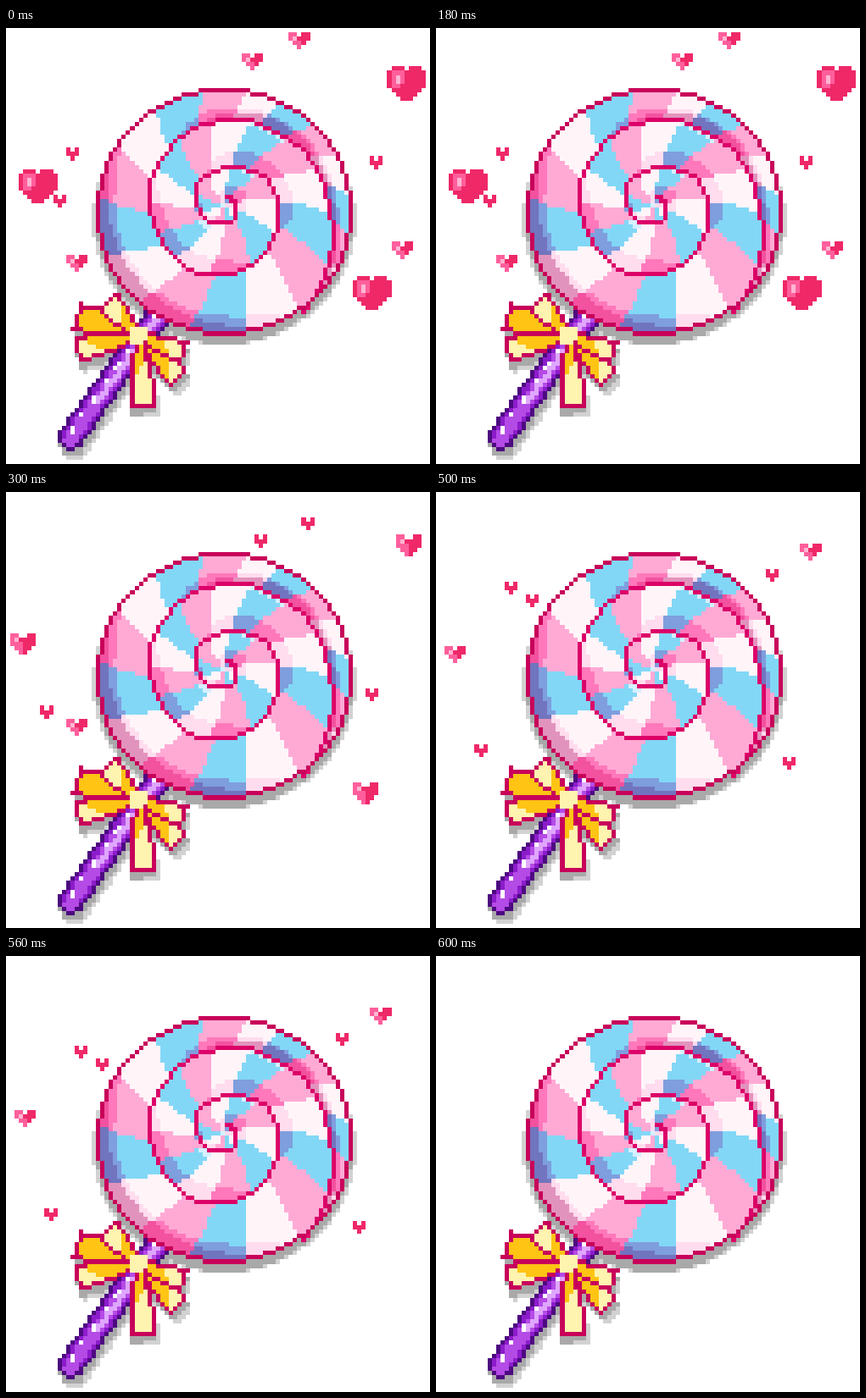
An HTML page with a canvas for the animation above (0.7 s loop, 500 by 515 pixels).

```html
<!DOCTYPE html>
<html>
<head>
<meta charset="utf-8">
<title>Lollipop</title>
<style>
html, body { margin: 0; height: 100%; overflow: hidden; background: #fff; }
canvas { display: block; width: 100vw; height: 100vh; image-rendering: pixelated; }
</style>
</head>
<body>
<canvas id="view" width="99" height="102"></canvas>
<script>
const W = 99, H = 102, CELL = 500 / W;
const view = document.getElementById('view').getContext('2d');
const art = document.createElement('canvas');
art.width = W; art.height = H;
const g = art.getContext('2d');

const EDGE = '#c8005a', LINE = '#dc0068', GREY = '#a9a9a9', MIST = '#d2d2d2';
const GOLD = '#ffc414', CREAM = '#fff3b0';
const DARK = '#4d0a80', PURPLE = '#8c1ccb', VIOLET = '#b54be6', LILAC = '#dfa6ff';
// Each stripe: base, half shade, full shade, shine
const STRIPES = [
  ['#82d7f6', '#7f9edd', '#7174be', '#d5f1ff'],
  ['#ffaad5', '#ff78bb', '#f2529f', '#ffaad5'],
  ['#fff5f9', '#ffdcee', '#e293bd', '#fff5f9']
];

// Paints each cell with colorAt(x, y); cells that touch the outside take the edge colour.
function fill(colorAt, edge, dx = 0, dy = 0) {
  for (let j = 0; j < H; j++) for (let i = 0; i < W; i++) {
    const x = (i + .5) * CELL - dx, y = (j + .5) * CELL - dy, color = colorAt(x, y);
    if (!color) continue;
    const core = colorAt(x - CELL, y) && colorAt(x + CELL, y) && colorAt(x, y - CELL) && colorAt(x, y + CELL);
    g.fillStyle = edge && !core ? edge : color;
    g.fillRect(i, j, 1, 1);
  }
}

const shadow = (shape, color, dx, dy) => fill((x, y) => shape(x, y) && color, null, dx, dy);

// The spiral: radius by quarter turn n, clockwise from the right, capped by the rim.
const CX = 258, CY = 210;
const RADII = [0, 2, 5, 11, 13, 21, 35, 47, 64, 81, 90, 102, 124, 175];
const key = i => RADII[Math.max(0, Math.min(RADII.length - 1, i))];

function radius(n) {
  const i = Math.floor(n + 4), t = n + 4 - i;
  const [a, b, c, d] = [i - 1, i, i + 1, i + 2].map(key);
  const r = b + t * (c - a + t * (2 * a - 5 * b + 4 * c - d + t * (3 * (b - c) + d - a))) / 2;
  return Math.min(r, 149 + 7 * Math.sin(n * Math.PI / 2));
}

function candy(x, y) {
  if (((x - 257.5) / 151.5) ** 2 + ((y - 217) / 146.4) ** 2 > 1) return;
  const r = Math.hypot(x - CX, y - CY), angle = Math.atan2(y - CY, x - CX);
  let n = (angle / Math.PI * 2 + 4) % 4 - 4;
  while (n < 4.7 && r > radius(n + 4)) n += 4;
  const t = (r - radius(n)) / (radius(n + 4) - radius(n) || 1);

  // Stripes come evenly along the arm and crowd together at its outer end.
  const s = (n - .72) / .285 + 1.4 * Math.max(0, n - 7) + 1.05 * Math.max(0, 1.3 - n) - .35 * (t - .5);
  const stripe = STRIPES[(Math.round(s) + 30) % 3];

  // The arm is lit like a tube from the upper right.
  const outer = n > 4.7;
  const lit = (t - .5) * Math.cos(angle + Math.PI / 4) * (outer ? 1.4 : 1) - Math.max(0, n - 8);
  if (lit < -.3 && outer) return stripe[2];
  return stripe[lit < -.16 ? 1 : lit > .34 && !outer ? 3 : 0];
}

function spiral() {
  const at = n => [CX + radius(n) * Math.cos(n * Math.PI / 2), CY + radius(n) * Math.sin(n * Math.PI / 2)]
    .map(v => Math.floor(v / CELL));
  g.fillStyle = LINE;
  for (let n = -1; n < 8.6; n += .2) {
    const [ax, ay] = at(n), [bx, by] = at(n + .2);
    const steps = Math.max(Math.abs(bx - ax), Math.abs(by - ay), 1);
    for (let k = 0; k <= steps; k++)
      g.fillRect(Math.round(ax + (bx - ax) * k / steps), Math.round(ay + (by - ay) * k / steps), 1, 1);
  }
}

// Position along (0..1) and across a line from a to b, in pixels across.
function along(x, y, ax, ay, bx, by) {
  const vx = bx - ax, vy = by - ay, len = Math.hypot(vx, vy);
  return [((x - ax) * vx + (y - ay) * vy) / len ** 2, ((y - ay) * vx - (x - ax) * vy) / len];
}

function stick(x, y) {
  const [ax, ay, bx, by] = [77, 483, 175, 346];
  const [u, q] = along(x, y, ax, ay, bx, by), c = Math.max(0, Math.min(1, u));
  if (Math.hypot(x - ax - c * (bx - ax), y - ay - c * (by - ay)) > 15.5) return;
  if (q < -7 || q > 8) return PURPLE;
  if (q < -2) return Math.sin(u * 45) > .3 && q > -6 ? '#fff' : VIOLET;
  return u > .3 && q < 5 ? LILAC : VIOLET;
}

// A ribbon widens from the knot to its end and turns from gold to cream past the cut.
const ribbon = (ex, ey, width, cut) => (x, y) => {
  const [u, q] = along(x, y, 156, 364, ex, ey);
  if (u < 0 || u > 1 || Math.abs(q) > 5 + (width / 2 - 5) * Math.min(1, u * 1.6)) return;
  return u - q / 60 > cut ? CREAM : GOLD;
};

const bow = [
  ribbon(82, 340, 34, 2), ribbon(120, 322, 30, .55), ribbon(82, 380, 30, .7),
  ribbon(206, 414, 28, .7), ribbon(162, 448, 30, .45), ribbon(211, 384, 28, .6)
];
const knot = (x, y) => Math.hypot(x - 156, y - 363) < 11 && CREAM;

for (const part of [stick, ...bow]) shadow(part, MIST, 4, 13);
for (const dx of [-4, 4]) shadow(candy, MIST, dx, 10);
for (const part of [stick, ...bow]) shadow(part, GREY, 1, 9);
shadow(candy, GREY, 0, 10);
fill(stick, DARK);
fill(candy);
spiral();
fill((x, y) => candy(x, y) && !(candy(x - CELL, y) && candy(x + CELL, y) && candy(x, y - CELL) && candy(x, y + CELL)) && EDGE);
for (const part of bow) fill(part, EDGE);
fill(knot);

function heart(x, y, w, h) {
  const mid = (w - 1) / 2, drop = Math.min(3, Math.floor(mid)), big = w > 8;
  for (let j = 0; j < h; j++) for (let i = 0; i < w; i++) {
    const inset = j ? Math.max(0, j - h + 1 + drop) : +big;
    if (i < inset || i >= w - inset || !j && Math.abs(i - mid) < 1) continue;
    const soft = big ? i > 0 && i < 4 && j > 0 && j < 5 && i + j < 7 : w > 3 && i < 2 + (j > 1);
    const shine = big ? i === 2 && (j === 2 || j === 3) : w > 3 && i === 1 && j === 1;
    view.fillStyle = shine ? '#ffb5d3' : soft ? '#ff5f9c' : '#ef2868';
    view.fillRect(x + i, y + j, 1, 1);
  }
}

const sizes = { big: [9, 8], mid: [6, 5], small: [5, 4], tiny: [3, 3] };
const poses = [
  { until: 300, big: [[3, 33], [89, 9], [81, 58]], small: [[66, 1], [55, 6], [14, 53], [90, 50]], tiny: [[14, 28], [11, 39], [85, 30]] },
  { until: 500, mid: [[91, 10], [1, 33], [81, 68]], small: [[14, 53]], tiny: [[58, 10], [69, 6], [84, 46], [8, 50]] },
  { until: 600, small: [[85, 12], [2, 36]], tiny: [[77, 18], [16, 21], [21, 24], [81, 62], [9, 59]] },
  { until: 700 }
];

function draw(time) {
  const pose = poses.find(p => time % 700 < p.until);
  view.clearRect(0, 0, W, H);
  view.drawImage(art, 0, 0);
  for (const size in sizes)
    for (const [x, y] of pose[size] || []) heart(x, y, ...sizes[size]);
}

const start = performance.now();
function tick() {
  draw(performance.now() - start);
  requestAnimationFrame(tick);
}
tick();
</script>
</body>
</html>
```
